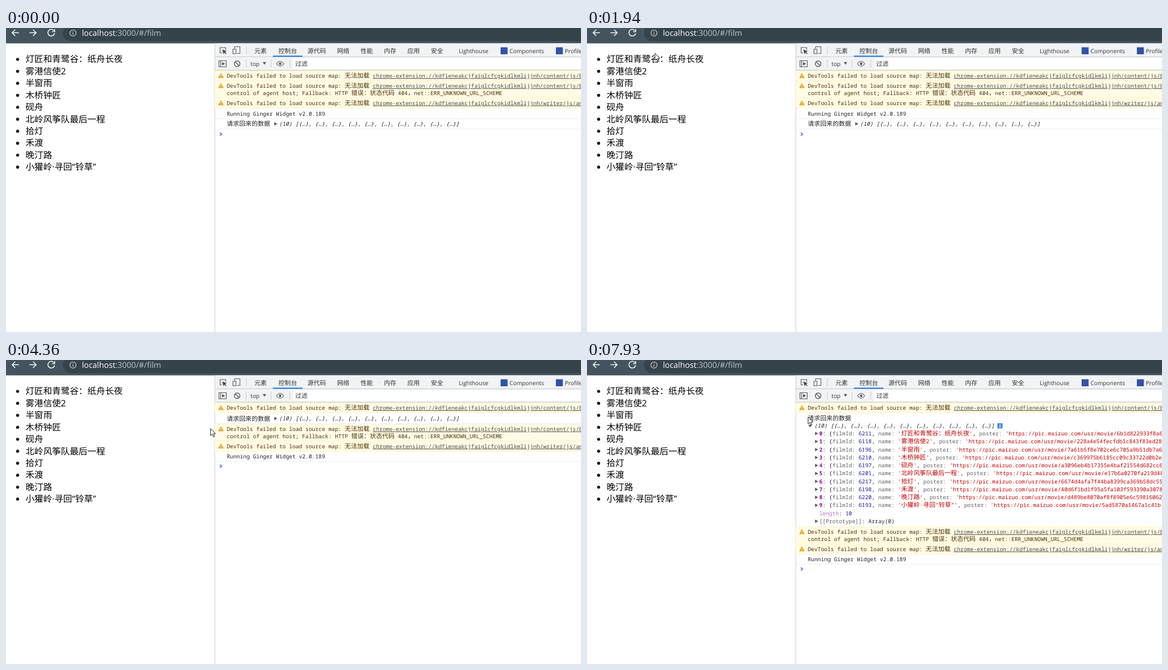
An HTML page that plays this animation: 1030x544 px, repeating every 8 s.

```html
<!DOCTYPE html>
<html lang="zh">
<head>
<meta charset="utf-8">
<title>Film list</title>
<style>
html, body { margin: 0; width: 100%; height: 100%; overflow: hidden; background: #fff; }
svg { display: block; width: 1030px; height: 544px; }
text { white-space: pre; text-rendering: geometricPrecision; }
.page { font: 15.83px 'Open Sans', 'Noto Sans CJK SC', 'Noto Sans CJK JP', sans-serif; }
.url { font: 14.33px 'Open Sans', sans-serif; }
.ui { font: 10.3px 'Open Sans', 'Noto Sans CJK SC', 'Noto Sans CJK JP', sans-serif; fill: #333; }
.mono { font: 9.79px 'Noto Sans Mono', 'Noto Sans CJK SC', 'Noto Sans CJK JP', monospace; fill: #222; }
.cjk { font-size: 11.1px; }
.warn { fill: #4f3206; }
.link { fill: #4c4c4c; text-decoration: underline; }
.it { font-style: italic; }
.key { fill: #5f6368; }
.num { fill: #1a1aa6; }
.str { fill: #c80000; }
.idx { fill: #881391; font-weight: bold; }
.dim { fill: #b871bd; }
.icon { fill: none; stroke: #555; stroke-width: 1.1; }
.nav { fill: none; stroke: #fff; stroke-width: 1.5; }
</style>
</head>
<body>
<svg id="stage" viewBox="0 0 1030 544" xmlns="http://www.w3.org/2000/svg"></svg>
<script>
const stage = document.getElementById('stage');

const films = [
  ['灯匠和青鹭谷：纸舟长夜', 6211, '6b1d822933f8a6'],
  ['雾港信使2', 6118, '228a4e54fecfdb1c843f83ed28'],
  ['半窗雨', 6196, '7a61b5f8e702ce6c705a9b51db7a6'],
  ['木桥钟匠', 6210, 'c369975b6185cc09c33722d0b2e'],
  ['砚舟', 6197, 'a3096eb4b17355e4baf21554d682cc6'],
  ['北岭风筝队最后一程', 6201, 'e17b6a0270fa219d48'],
  ['拾灯', 6217, '6674d4afa7f44ba8399ca369b58dc55'],
  ['禾渡', 6198, '40d6f1bd1f95a5fa103f593390a3078'],
  ['晚汀路', 6220, 'd489be8070af8f8905e6c59816062'],
  ['小獾岭·寻回“铃草”', 6193, '5ad5870a1467a1c41b']
];

// Markup helpers
const rect = (x, y, w, h, fill, more = '') =>
  `<rect x="${x}" y="${y}" width="${w}" height="${h}" fill="${fill}" ${more}/>`;
const path = (d, cls, more = '') => `<path d="${d}" class="${cls}" ${more}/>`;
const text = (x, y, cls, body) => `<text x="${x}" y="${y}" class="${cls}">${body}</text>`;
const group = (id, body) => `<g id="${id}">${body}</g>`;
const wide = s => s.replace(/[\u3000-\u9fff\uff00-\uffef]+/g, m => `<tspan class="cjk">${m}</tspan>`);
const span = (cls, s) => `<tspan class="${cls}">${wide(s)}</tspan>`;
const mono = (x, y, body, cls = '') => text(x, y, 'mono ' + cls, body);
const tri = (x, y) => `<path d="M${x} ${y - 3}l5.5 3l-5.5 3z" fill="#555"/>`;
const triDown = (x, y, w) => `<path d="M${x} ${y}h${w}l${-w / 2} ${w * 0.8}z" fill="#555"/>`;

function browserBar() {
  return rect(0, 0, 1030, 27.5, '#43545e') +
    rect(102, -5, 960, 28.5, '#36434b', 'rx="14"') +
    '<circle id="hover" cx="81" cy="9" r="13.5" fill="#64747d"/>' +
    path('M23 8.5H11M16.5 3L11 8.5l5.5 5.5', 'nav') +
    path('M42 8.5h12M48.5 3l5.5 5.5l-5.5 5.5', 'nav') +
    path('M85.8 4.6A6 6 0 1 0 87 9.5M87.2 2v4.5h-4.6', 'nav') +
    '<circle cx="120" cy="9" r="5.5" fill="none" stroke="#d5dade" stroke-width="1.2"/>' +
    path('M120 8.3v3.7M120 5.8v1.3', '', 'stroke="#d5dade" stroke-width="1.3"') +
    text(136, 14.2, 'url', '<tspan fill="#fff">localhost</tspan><tspan fill="#bcc5cc">:3000/#/film</tspan>');
}

function filmList() {
  return films.map(([name], i) => {
    const y = 55.7 + i * 21.44;
    return `<circle cx="20.8" cy="${y + 0.4}" r="2.7"/>` + text(35, y + 5.7, 'page', name);
  }).join('');
}

function panelHead() {
  const tabs = [[445, '元素'], [488, '控制台'], [540, '源代码'], [593, '网络'], [635, '性能'],
    [677, '内存'], [719, '应用'], [761, '安全']];
  const dividers = [[430, 33], [430, 57], [474, 57], [508, 57]];
  return rect(374, 27.5, 656, 48, '#f1f3f4') +
    rect(374, 51, 656, 1, '#cacdd1') + rect(374, 75, 656, 1, '#cacdd1') +
    rect(373.5, 27.5, 1, 517, '#cacdd1') +
    rect(478, 49.5, 53, 2, '#1a73e8') +
    tabs.map(([x, s]) => text(x, 45, 'ui', wide(s))).join('') +
    text(811, 44.6, 'ui', 'Lighthouse') + text(902, 44.6, 'ui', 'Components') +
    text(1001, 44.6, 'ui', 'Profiler') +
    rect(886, 34.5, 12.5, 12.5, '#3152a8') + rect(985, 34.5, 12.5, 12.5, '#3152a8') +
    dividers.map(([x, y]) => rect(x, y, 1, 14, '#cacdd1')).join('') +
    path('M387 44.5h-3.5v-9.5h10v4', 'icon') +
    '<path d="M387.5 38.5l8 3l-3.2 1.2l2.7 2.8l-1.2 1.2l-2.7 -2.8l-1.4 3z" fill="#444"/>' +
    path('M409.5 37v-3.5h9.5v12h-5M406.5 38h5.5v8h-5.5z', 'icon') +
    path('M381.5 58.5h13v11h-13zM384.5 58.5v11', 'icon') + tri(387, 64) +
    '<circle cx="414" cy="64" r="5" class="icon" style="stroke-width:1.4"/>' +
    path('M410.5 60.5l7 7', 'icon', 'style="stroke-width:1.4"') +
    text(438, 67.7, 'ui', 'top') + triDown(460, 61, 6) +
    path('M484.5 64q6.5 -8.5 13 0q-6.5 8.5 -13 0z', 'icon') +
    '<circle cx="491" cy="64" r="2.2" fill="#555"/>' +
    rect(514, 54, 520, 19.5, '#fff') + text(518, 68, 'ui', wide('过滤'));
}

function warnRow(tail, second) {
  const h = second ? 31 : 18.5;
  const base = 'chrome-extension://kdfieneakcjfaiglcfcgkidlkmlijjnh/';
  return rect(374, 0, 656, h, '#fffbe5') +
    rect(374, 0, 656, 0.8, '#fff2bd') + rect(374, h, 656, 0.8, '#fff2bd') +
    '<path d="M385 5.6l4 7.4h-8z" fill="#e8a11c" stroke="#e8a11c" stroke-width="1.2" stroke-linejoin="round"/>' +
    path('M385 7.5v3M385 11.3v1.2', '', 'stroke="#fff" stroke-width="1.1"') +
    mono(395.5, 13, wide('DevTools failed to load source map: 无法加载 ') + span('link', base + tail), 'warn') +
    (second ? mono(395.5, 25.8, wide(second), 'warn') : '');
}

const summary = '(10) [' + Array(10).fill('{…}').join(', ') + ']';

function openRow() {
  const line = i => 40 + i * 14.27;
  const items = films.map(([name, id, hash], i) =>
    tri(408.5, line(i) - 3.4) +
    mono(416, line(i), span('idx', i + '') + ': {' + span('key', 'filmId: ') + span('num', id + '') +
      ', ' + span('key', 'name: ') + span('str', `'${name}'`) + ', ' + span('key', 'poster: ') +
      span('str', `'https://pic.maizuo.com/usr/movie/${hash}`))).join('');
  return mono(395.5, 12.6, wide('请求回来的数据')) + triDown(396.5, 21, 6) +
    mono(407, 26.3, summary, 'it') +
    rect(735, 18, 9.5, 9.5, '#4a8fd8', 'rx="1.5"') +
    path('M739.7 22v4M739.7 19.5v1.4', '', 'stroke="#fff" stroke-width="1.3"') +
    items + mono(416, line(10), span('dim', 'length') + ': ' + span('num', '10')) +
    tri(408.5, line(11) - 3.4) + mono(416, line(11), span('key', '[[Prototype]]') + ': Array(0)');
}

const rows = {
  w1: warnRow('content/js/b'),
  w2: warnRow('content/js/b', 'control of agent host; Fallback: HTTP 错误：状态代码 404，net::ERR_UNKNOWN_URL_SCHEME'),
  w3: warnRow('writer/js/an'),
  run: mono(395.5, 13, 'Running Ginger Widget v2.0.189') + rect(374, 18.2, 656, 0.8, '#ececec'),
  data: mono(395.5, 13.4, wide('请求回来的数据')) + tri(480.5, 9.4) +
    mono(489, 12.9, summary, 'it') + rect(374, 18.4, 656, 0.8, '#ececec'),
  open: openRow(),
  prompt: path('M383.2 -2.6l3 2.6l-3 2.6', '', 'fill="none" stroke="#2a66d9" stroke-width="1.5"')
};

const arrow = '<path d="M0 0v12.5l2.9 -2.7l2.2 5l2.1 -0.9l-2.2 -4.9h4z" fill="#fff" stroke="#222"/>';
const beam = path('M-2.5 -6h2l0.5 0.6l0.5 -0.6h2M0 -5.4v10.8M-2.5 6h2l0.5 -0.6l0.5 0.6h2', '',
  'fill="none" stroke="#dfe3e6" stroke-width="1.1"');

stage.innerHTML = rect(0, 0, 1030, 544, '#fff') + filmList() + browserBar() + panelHead() +
  Object.keys(rows).map(id => group(id, rows[id])).join('') +
  group('arrow', arrow) + group('beam', beam);

const el = id => document.getElementById(id);
const show = (id, on) => el(id).setAttribute('display', on ? 'inline' : 'none');
const move = (id, x, y) => el(id).setAttribute('transform', `translate(${x} ${y})`);

// Top of every visible row
const empty = { prompt: 86 };
const first = { w1: 76, prompt: 104 };
const loading = { w1: 76, data: 95, prompt: 123 };
const dataLast = { w1: 76, w2: 94, w3: 124.7, run: 143.5, data: 162, prompt: 190 };
const dataFirst = { w1: 76, data: 95.3, w2: 114, w3: 144.7, run: 163, prompt: 190 };
const expanded = { w1: 76, open: 95, w2: 298, w3: 328.7, run: 347, prompt: 374 };
const layouts = [[0, dataLast], [1120, empty], [1190, first], [1330, dataLast],
  [2290, empty], [2420, first], [2560, loading], [2760, dataFirst], [6090, expanded]];

// Pointer: time, x, y
const track = [
  [70, 940, 530], [830, 119, 46], [900, 118, 45], [1040, 80, 7], [1300, 82, 9], [1460, 121, 50],
  [1660, 203, 118], [1730, 202, 117], [2080, 79, 7], [2290, 80, 8], [2630, 216, 83],
  [2970, 278, 31], [3200, 250, 20], [3460, 210, 17], [3810, 114, 12], [3870, 114, 12],
  [4640, 474, 170], [5000, 525, 175], [5300, 442, 150], [5480, 472, 117], [5550, 474, 112],
  [5620, 483, 107], [5890, 482, 104], [6090, 482, 104], [6590, 542, 177], [6870, 606, 187],
  [7050, 612, 186], [7710, 421, 104], [7790, 418, 100], [7930, 396, 102]
];

function pointer(t) {
  const i = track.findIndex(k => k[0] > t);
  if (i < 0) return track[track.length - 1].slice(1);
  const [t0, x0, y0] = track[i - 1], [t1, x1, y1] = track[i];
  const p = (t - t0) / (t1 - t0), e = p * p * (3 - 2 * p);
  return [x0 + (x1 - x0) * e, y0 + (y1 - y0) * e];
}

function draw(t) {
  const layout = layouts.filter(l => l[0] <= t).pop()[1];
  for (const id in rows) {
    show(id, id in layout);
    if (id in layout) move(id, 0, layout[id]);
  }
  show('hover', (t >= 1000 && t < 1500) || (t >= 2020 && t < 2420));
  const visible = t >= 70;
  const [x, y] = visible ? pointer(t) : [0, 0];
  const typing = y < 24 && x > 102;
  show('arrow', visible && !typing);
  show('beam', visible && typing);
  move('arrow', x, y);
  move('beam', x, y);
}

function tick() {
  draw(performance.now() % 8000);
  requestAnimationFrame(tick);
}
tick();
</script>
</body>
</html>
```
